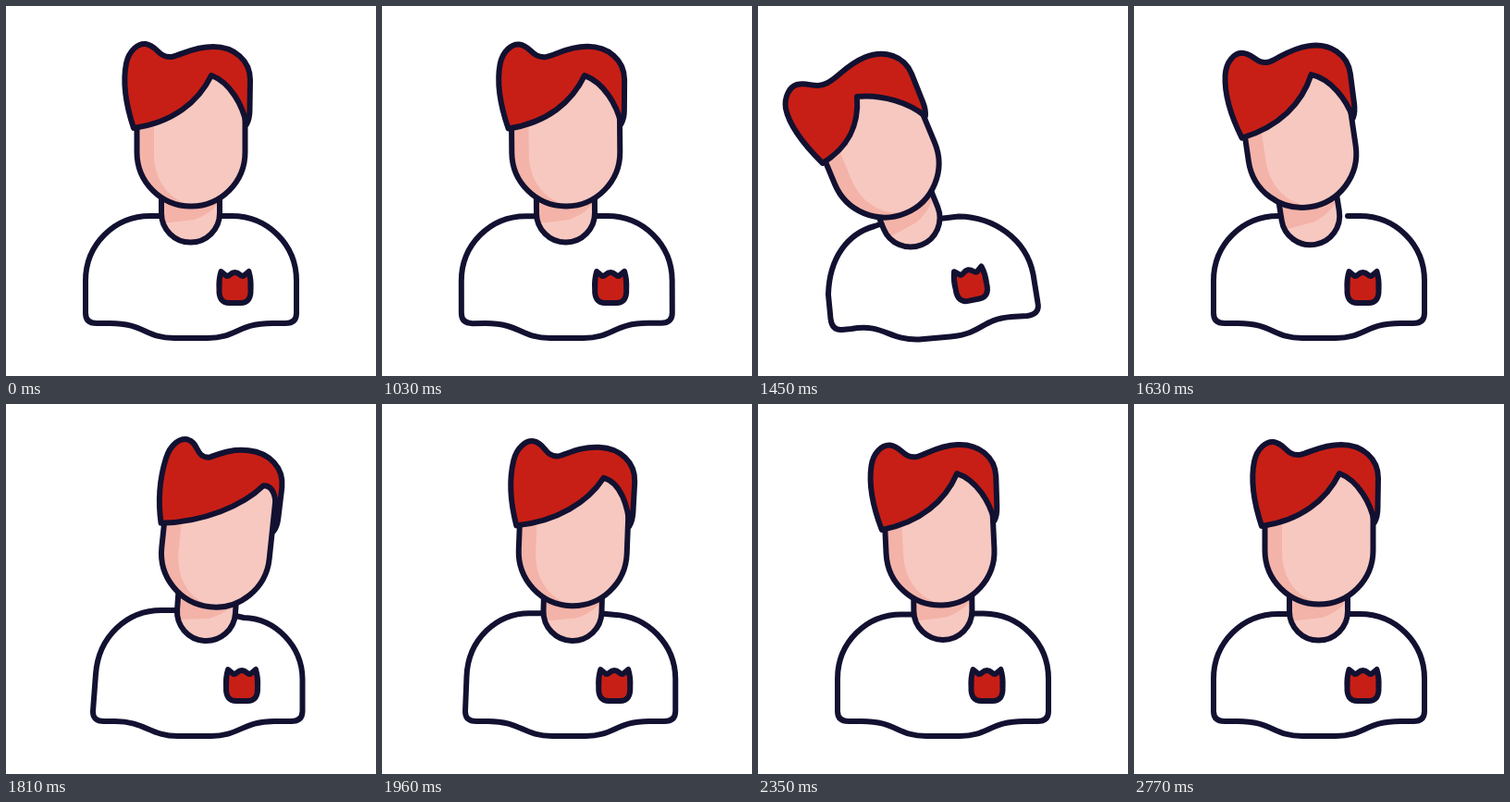
An HTML page with a canvas that plays this animation: 400 by 400 pixels, repeating every 2800 ms.

```html
<!DOCTYPE html>
<html lang="en">
<head>
<meta charset="utf-8">
<title>Swaying avatar</title>
<style>
html, body { margin: 0; width: 100%; height: 100%; overflow: hidden; background: #fff; }
canvas { display: block; width: 100vw; height: 100vh; }
</style>
</head>
<body>
<canvas id="stage"></canvas>
<script>
const canvas = document.getElementById('stage');
const ctx = canvas.getContext('2d');
const SIZE = 400, LOOP = 2800, START = 1030, STEP = 30;
const INK = '#121131', RED = '#c71f16', SKIN = '#f7c8c0', SHADE = '#f4b3a8';

// time, head x, head lift, head angle, face turn, neck x, neck y, neck angle, body lean, shoulder tilt
const KEYS = [
  [1000, 0, 0, 0, 0, 0, 0, 0, 0, 0],
  [1030, -1.2, 0, -.5, -.05, -1, 0, -.4, -.02, 0],
  [1450, -63, 0, -22.6, -1, -34.5, 5, -22, -1, 0],
  [1810, 26.5, 1, 6, 1, 17, .5, 4, 1, 0],
  [2110, -14, 2, -2, -.25, -4, .5, -1, 0, 2.5],
  [2350, -3, 1, -2.7, 0, .4, -.5, -.5, 0, .5],
  [2530, 2, -.5, 1, .06, .5, 0, .3, .12, 0],
  [2770, 0, 0, 0, 0, 0, 0, 0, 0, 0]
];

// outline points of the shirt: upright, leaning left, leaning right
const UPRIGHT = [
  168,227, 156,227, 117,227, 86,258, 86,297, 86,332, 86,343, 98,343,
  112,343, 150,343, 150,359, 182,359, 218,359, 250,359, 250,343, 288,343,
  302,343, 314,343, 314,332, 314,297, 314,258, 283,227, 244,227, 231,227];
const LEFT = [
  135,235, 126,238, 97,246, 77,272, 76,312, 78.5,338, 80,351, 91,350,
  101,349, 136,343, 141,361.5, 174,360.5, 208,357.5, 244,354, 240,339, 274,336,
  291,335, 305,333, 302.5,321, 297.5,290, 290,252, 255,228, 217,227.5, 196,230];
const RIGHT = [
  186,223, 168,223, 131,223, 100,251, 97,292, 94,332, 93.5,343, 106,343,
  118,343, 150,343, 156,359, 186,359, 222,359, 252,359, 256,343, 290,343,
  308,343, 320.5,343, 320.5,332, 320.5,297, 320,262, 292,232, 257,231, 248,229];

// builds a path from a string of commands and a flat list of coordinates
const ARITY = { M: 2, L: 2, Q: 4, C: 6, Z: 0 };
function shape(cmds, pts) {
  let i = 0, d = '';
  for (const c of cmds) {
    d += c + pts.slice(i, i + ARITY[c]).join(' ') + ' ';
    i += ARITY[c];
  }
  return new Path2D(d);
}

function paint(path, fill) {
  ctx.fillStyle = fill;
  ctx.fill(path);
  ctx.stroke(path);
}

function placed(x, y, deg, draw) {
  ctx.save();
  ctx.translate(x, y);
  ctx.rotate(deg * Math.PI / 180);
  draw();
  ctx.restore();
}

// monotone cubic through the keys: flat at every turning point
function gradient(k, c) {
  return (KEYS[k + 1][c] - KEYS[k][c]) / (KEYS[k + 1][0] - KEYS[k][0]);
}
function tangent(k, c) {
  if (k === 0 || k === KEYS.length - 1) return 0;
  const a = gradient(k - 1, c), b = gradient(k, c);
  return a * b > 0 ? 2 * a * b / (a + b) : 0;
}
function poseAt(t) {
  if (t <= KEYS[0][0] || t >= KEYS[KEYS.length - 1][0]) return KEYS[0].slice(1);
  let k = 0;
  while (t >= KEYS[k + 1][0]) k++;
  const span = KEYS[k + 1][0] - KEYS[k][0];
  const u = (t - KEYS[k][0]) / span, v = 1 - u;
  return KEYS[k].slice(1).map((a, i) => {
    const c = i + 1, b = KEYS[k + 1][c];
    return a * v * v * (1 + 2 * u) + b * u * u * (3 - 2 * u)
      + span * u * v * (v * tangent(k, c) - u * tangent(k + 1, c));
  });
}

function drawBody(lean, tilt) {
  const goal = lean < 0 ? LEFT : RIGHT, w = Math.abs(lean);
  const pts = UPRIGHT.map((p, i) => p + (goal[i] - p) * w);
  for (const i of [1, 3]) {
    pts[i] += tilt;
    pts[pts.length - i] -= tilt;
  }
  paint(shape('MLCLQLCLCLQLCL', pts), '#fff');

  const left = Math.max(-lean, 0), right = Math.max(lean, 0);
  placed(247.5 - 17.5 * left + 7.5 * right, 304 - 3 * left, -11 * left, () => {
    paint(shape('MCLCCLCCLCZ', [
      -17, 2, -17.5, -5, -16.5, -12, -15, -17, -9, -12,
      -6, -11, -5, -16, 0, -16, 5, -16, 6, -11, 9, -12,
      15, -17, 16.5, -12, 17.5, -5, 17, 2,
      17.5, 12, 14, 17, 6, 17, -6, 17,
      -14, 17, -17.5, 12, -17, 2
    ]), RED);
  });
}

function drawNeck(x, y, deg) {
  placed(199.5 + x, 224 + y, deg, () => {
    const neck = new Path2D();
    neck.moveTo(-31.5, -18);
    neck.lineTo(-31.5, 0);
    neck.arc(0, 0, 31.5, Math.PI, 0, true);
    neck.lineTo(31.5, -18);
    ctx.fillStyle = SKIN;
    ctx.fill(neck);
    ctx.save();
    ctx.clip(neck);
    ctx.fillStyle = SHADE;
    ctx.fill(shape('MLLQZ', [-32, 11, -32, -20, 32, -20, 32, -4, 4, 7, -32, 11]));
    ctx.restore();
    ctx.stroke(neck);
  });
}

function drawHead(x, y, deg, turn) {
  placed(200 + x, 158 + y, deg, () => {
    const face = new Path2D();
    face.moveTo(-58.5, -92);
    face.lineTo(-58.5, 0);
    face.arc(0, 0, 58.5, Math.PI, 0, true);
    face.lineTo(58.5, -92);
    face.closePath();
    ctx.fillStyle = SHADE;
    ctx.fill(face);
    ctx.save();
    ctx.clip(face);
    ctx.fillStyle = SKIN;
    ctx.fill(shape('MLCLLZ', [-40, -92, -40, 2, -40, 32, -22, 54, 4, 58, 60, 60, 60, -92]));
    ctx.restore();
    ctx.stroke(face);

    ctx.translate(-200, -158);
    const lobe = 6 * turn, lift = -2 * turn;
    paint(shape('MCCCCCLQCCZ', [
      138, 132,
      130 + lobe / 3, 108, 126 + lobe, 82, 130 + lobe, 62,
      133 + lobe, 48 + lift, 143 + lobe, 40 + lift, 151 + lobe, 41 + lift,
      164 + lobe, 43 + lift, 164 + lobe / 2, 56 - lift / 2, 179 + lobe / 2, 55 - lift / 2,
      190, 53, 202, 44, 224, 44,
      247, 44, 264, 59, 264, 80,
      263.5, 112,
      263.5, 122, 260, 128,
      256 + 6 * turn, 108, 243 + 17 * turn, 83 - 5 * turn, 222 + 22 * turn, 75 + 5 * Math.abs(turn),
      208 + 16 * turn, 104, 180 + 4 * turn, 126, 138, 132
    ]), RED);
  });
}

function draw(t) {
  const [hx, lift, hr, turn, nx, ny, nr, lean, tilt] = poseAt(t);
  const scale = canvas.width / SIZE;
  ctx.setTransform(scale, 0, 0, canvas.height / SIZE, 0, 0);
  ctx.fillStyle = '#fff';
  ctx.fillRect(0, 0, SIZE, SIZE);
  ctx.strokeStyle = INK;
  ctx.lineWidth = 6;
  ctx.lineCap = ctx.lineJoin = 'round';
  drawBody(lean, tilt);
  drawNeck(nx, ny, nr);
  drawHead(hx, hx * hx / 330 + lift, hr, turn);
}

function resize() {
  const ratio = window.devicePixelRatio || 1;
  canvas.width = Math.round(innerWidth * ratio);
  canvas.height = Math.round(innerHeight * ratio);
}

const begin = performance.now();
function tick() {
  const t = (performance.now() - begin) % LOOP;
  draw(t < START ? 0 : START + STEP * Math.floor((t - START) / STEP));
  requestAnimationFrame(tick);
}

addEventListener('resize', resize);
resize();
tick();
</script>
</body>
</html>
```
